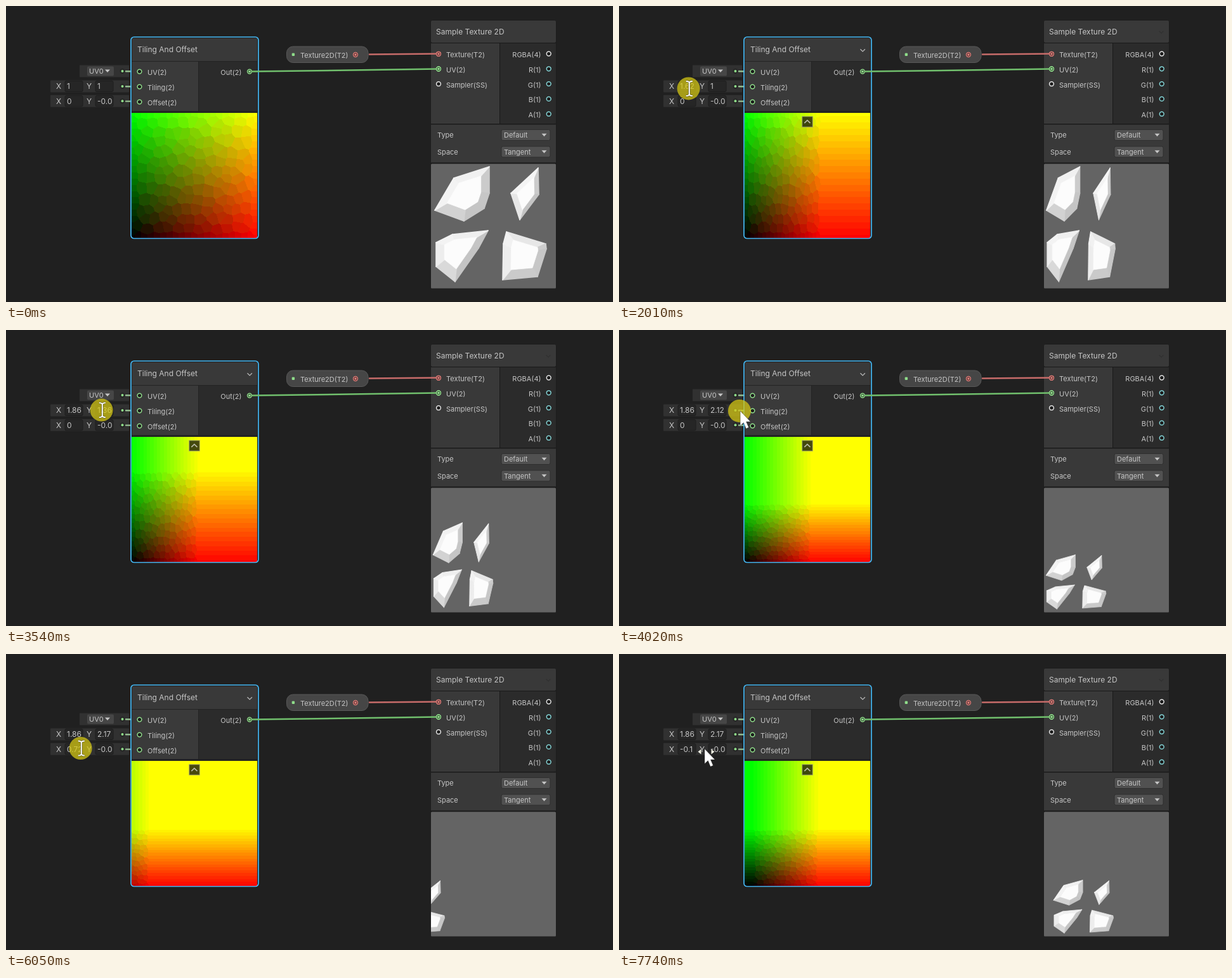
Animation, 957 px wide and 468 px high, one loop 8000 ms. Source, as an HTML page with a canvas:

```html
<!DOCTYPE html>
<html lang="en">
<head>
<meta charset="utf-8">
<title>Tiling and offset</title>
<style>
  html, body { margin: 0; width: 100%; height: 100%; overflow: hidden; background: #202020; }
  #uv, #ui { position: absolute; display: block; }
  #uv { left: 198px; top: 169px; }
  #ui { left: 0; top: 0; }
  text { font: 11px Inter, sans-serif; fill: #c6c6c6; white-space: pre; }
  .big { font-size: 12px; }
</style>
</head>
<body>
<canvas id="uv" width="198" height="198"></canvas>
<svg id="ui" width="957" height="468" viewBox="0 0 957 468"></svg>
<script>
const GREEN = '#8fdc8a', RED = '#dc7a76', CYAN = '#84d4d6', WHITE = '#e4e4e4', BLUE = '#44b8f4';

const rect = (x, y, w, h, fill, extra = '') =>
  `<rect x="${x}" y="${y}" width="${w}" height="${h}" fill="${fill}" ${extra}/>`;
// y is the middle of the line of text
const label = (x, y, s, extra = '') => `<text x="${x}" y="${y + 4}" ${extra}>${s}</text>`;
const big = (x, y, s, extra = '') => label(x, y + .3, s, 'class="big" ' + extra);
const right = (x, y, s) => label(x, y, s, 'text-anchor="end"');
const line = (x1, y1, x2, y2, color, w) =>
  `<path d="M${x1} ${y1}L${x2} ${y2}" stroke="${color}" stroke-width="${w}" stroke-linecap="round"/>`;
const dot = (x, y, r, fill) => `<circle cx="${x}" cy="${y}" r="${r}" fill="${fill}"/>`;
const port = (x, y, color, linked) =>
  `<circle cx="${x}" cy="${y}" r="3.4" fill="#1c1c1c" stroke="${color}" stroke-width="1.5"/>` +
  (linked ? dot(x, y, 1.9, color) : '');
const down = (x, y) => `<path d="M${x - 4} ${y - 2}h8l-4 4.4z" fill="#c6c6c6"/>`;

function inputStrip(x, y) {
  return rect(x, y - 9.5, 194 - x, 19, '#313131', 'rx="1"') +
    dot(183.5, y, 4, '#262626') + dot(183.5, y, 2, GREEN) +
    line(189, y + .3, 206, y + .5, '#93bd90', 2.4);
}

function vectorRow(y, idX, idY) {
  const field = (x, name, id) => big(x, y, name) +
    rect(x + 14, y - 8.5, 28, 17, '#262626', 'rx="2" stroke="#1e1e1e"') + big(x + 17, y, '', `id="${id}"`);
  return inputStrip(70, y) + field(79, 'X', idX) + field(127, 'Y', idY);
}

function tilingNode() {
  const ports = ['UV(2)', 'Tiling(2)', 'Offset(2)'];
  return rect(198, 50, 199, 119, '#232323', 'rx="4"') +
    rect(198.5, 51, 197.5, 36, '#393939') + rect(198.5, 88, 104.5, 78, '#3a3a3a') + rect(304, 88, 92, 78, '#2b2b2b') +
    big(207, 69, 'Tiling And Offset') +
    ports.map((s, i) => label(223, 105 + 24 * i, s) + port(210.5, 103.6 + 24 * i, GREEN)).join('') +
    right(371.5, 105, 'Out(2)') + port(384, 103.6, GREEN, true) +
    rect(197, 49, 201, 318.5, 'none', `rx="5" stroke="${BLUE}" stroke-width="1.7"`);
}

const dropdown = (y, name, value) =>
  label(680, y, name) + rect(781, y - 8.5, 77, 17, '#515151', 'rx="2.5" stroke="#2e2e2e"') +
  label(785, y, value) + down(848.5, y - .2);

function sampleNode() {
  const ins = [['Texture(T2)', RED, true], ['UV(2)', GREEN, true], ['Sampler(SS)', WHITE]];
  const outs = ['RGBA(4)', 'R(1)', 'G(1)', 'B(1)', 'A(1)'];
  return rect(669.5, 22.5, 198, 424.5, '#1a1a1a', 'rx="4"') +
    rect(670, 23, 197, 35, '#393939', 'rx="2"') +
    rect(670, 59, 108, 127, '#393939') + rect(779, 59, 88, 127, '#2b2b2b') +
    rect(670, 187.5, 197, 60, '#393939') + rect(670, 249.5, 197, 197, '#646464', 'rx="1.5"') +
    big(678, 41, 'Sample Texture 2D') +
    ins.map(([s, c, on], i) => label(694, 77 + 24 * i, s) + port(682, 75.8 + 23.7 * i, c, on)).join('') +
    outs.map((s, i) => right(843.5, 77 + 23.8 * i, s) + port(855.7, 75.5 + 23.8 * i, i ? CYAN : WHITE)).join('') +
    dropdown(204, 'Type', 'Default') + dropdown(230.5, 'Space', 'Tangent');
}

// A clockwise outline shrinks to the bright face; each side is shaded by where it points
function stone(cx, cy, outline) {
  const pts = outline.split(' ').map(p => p.split(',').map(Number));
  const face = pts.map(([x, y]) => [cx + (x - cx) * .62, cy + (y - cy) * .62]);
  const shape = (p, c, w) =>
    `<polygon points="${p.join(' ')}" fill="${c}" stroke="${c}" stroke-width="${w}" stroke-linejoin="round"/>`;
  return pts.map((a, i) => {
    const j = (i + 1) % pts.length, b = pts[j];
    const dx = b[0] - a[0], dy = b[1] - a[1];
    const v = Math.round(220 - 17 * (dy - dx) / Math.hypot(dx, dy));
    return shape([a, b, face[j], face[i]], `rgb(${v},${v},${v})`, 1.6);
  }).join('') + shape(face, '#fcfcfc', .8);
}
const stones =
  stone(727, 293, '762,254 762,296 754,320 722,340 676,323 706,272') +
  stone(821, 297, '839,256 840,298 810,338 796,296') +
  stone(713, 383, '760,355 745,383 708,436 678,412 678,374 704,361') +
  stone(817, 391, '789,357 851,376 852,384 838,428 783,433 784,376');

const BEAM = 'M-5-11.5Q0-11.5 0-8.5Q0-11.5 5-11.5M0-9V9M-5 11.5Q0 11.5 0 8.5Q0 11.5 5 11.5';
const ui = document.getElementById('ui');
ui.innerHTML =
  '<clipPath id="view"><rect x="670" y="249.5" width="197" height="197"/></clipPath>' +
  inputStrip(116, 103) + rect(128, 95.5, 42, 15, '#464646', 'rx="2"') + label(131, 103, 'UV0') + down(160, 102.6) +
  vectorRow(127, 'tileX', 'tileY') + vectorRow(150.3, 'offX', 'offY') +
  tilingNode() + sampleNode() +
  line(389, 103.6, 680, 99.5, '#71c06d', 2.5) + line(573, 76.6, 680, 75.6, '#c86c6a', 2.5) +
  port(682, 99.5, GREEN, true) + port(682, 75.8, RED, true) +
  rect(442.5, 64, 128.5, 25.5, '#464646', 'rx="10" stroke="#585858"') +
  rect(450.7, 74.6, 4.4, 4.4, GREEN, 'rx="1"') + label(464, 78, 'Texture2D(T2)') + port(551, 77, RED, true) +
  `<g clip-path="url(#view)"><g id="stones">${stones}</g></g>` +
  '<g id="marks" fill="none"><path d="M380.5 68.3l3.7 3.6 3.7-3.6" stroke="#b8b8b8" stroke-width="1.3"/>' +
  rect(288.7, 174.7, 16.6, 16.6, '#101010', 'fill-opacity=".76" stroke="#a8a890" stroke-opacity=".5" stroke-width="1.5"') +
  '<path d="M292.3 185.2l4.6-4.5 4.6 4.5" stroke="#b9b9a8" stroke-width="1.7"/></g>' +
  '<path id="dim" d="M851.5 39.8l3.5 3 3.5-3" fill="none" stroke="#313131" stroke-width="1.3"/>' +
  rect(669, 22, 199, 425, 'none', `id="hover" rx="5" stroke="${BLUE}" stroke-opacity=".5" stroke-width="1.5"`) +
  '<circle id="press" r="18" fill="#d8ca14" opacity=".73"/>' +
  '<g id="cursor"><path id="arrow" d="M0 0V23.5L5.3 18.6 9.2 28 13.4 26.2 9.5 17.1H16.2Z" fill="#fff" ' +
  'stroke="#222" stroke-opacity=".5" stroke-width=".8"/>' +
  '<path id="sides" d="M-5.5 .5v8l-5-4zM10.5 .5v8l5-4z" fill="#f4f4e4"/>' +
  `<g id="beam" fill="none"><path d="${BEAM}" stroke="#222" stroke-width="3.4" stroke-opacity=".5"/>` +
  `<path d="${BEAM}" stroke="#fff" stroke-width="1.9"/></g></g>`;

const el = {};
ui.querySelectorAll('[id]').forEach(n => el[n.id] = n);
const show = (n, on) => n.setAttribute('visibility', on ? 'visible' : 'hidden');

// Colour steps: each colour snaps to the nearest of a scattered set
let seed = 7;
const rnd = () => (seed = seed * 16807 % 2147483647) / 2147483647;
const swatches = [];
for (let i = 0; i <= 20; i++) {
  const e = i / 20;
  swatches.push([e, 0], [e, 1], [0, e], [1, e]);
}
for (let j = 0; j < 12; j++) for (let i = 0; i < 12; i++)
  swatches.push([(i + .75 + (j % 2) * .4 + (rnd() - .5) * .7) / 13, (j + 1 + (rnd() - .5) * .7) / 13]);

const N = 198, steps = new Uint8Array(N * N);
for (let k = 0; k < N * N; k++) {
  const r = (k % N) / (N - 1), g = Math.floor(k / N) / (N - 1);
  let best = 9;
  swatches.forEach(([a, b], n) => {
    const d = (a - r) ** 2 + (b - g) ** 2;
    if (d < best) { best = d; steps[k] = n; }
  });
}

const ctx = document.getElementById('uv').getContext('2d');
const img = ctx.createImageData(N, N);
const level = v => Math.round(Math.min(1, Math.max(0, v)) * (N - 1));
let last = '';

function paintUV(tx, ty, ox) {
  const key = [tx, ty, ox].join();
  if (key === last) return;
  last = key;
  for (let y = 0, p = 0; y < N; y++) {
    const row = level(ty * (1 - (y + .5) / N)) * N;
    for (let x = 0; x < N; x++, p += 4) {
      const c = swatches[steps[row + level(tx * (x + .5) / N + ox)]];
      img.data[p] = c[0] * 255;
      img.data[p + 1] = c[1] * 255;
      img.data[p + 3] = 255;
    }
  }
  ctx.putImageData(img, 0, 0);
}

// Cursor stops
const XLABEL = [82, 129], YLABEL = [133, 126], OFFSET = [82, 147], FIELD = [162, 152], OFFSET_Y = [134, 148];
// Glides: start, end, stop; a drag also names the value it changes
const moves = [
  [200, 1000, XLABEL],
  [1605, 2405, [122, 131], 'tx', 1.86],
  [2440, 2610, [137, 126]],
  [2820, 3080, YLABEL],
  [3400, 4160, [194, 128], 'ty', 2.17],
  [4240, 4840, OFFSET],
  [5165, 5790, [121, 149], 'ox', .76],
  [5790, 6050, [119, 149], 'ox', .72],
  [6050, 6430, [80, 148], 'ox', -.11],
  [6480, 6670, FIELD],
  [6880, 6940, OFFSET_Y],
  [7030, 7150, FIELD],
  [7350, 7480, [139, 148]],
  [7690, 7740, [135, 150]]
];
const easeOut = p => 1 - (1 - p) ** 1.8;
const mix = (a, b, p) => a + (b - a) * p;

function stateAt(t) {
  const s = { x: 880, y: 452, tx: 1, ty: 1, ox: 0, pressed: false };
  for (const [start, end, [x, y], name, value] of moves) {
    if (t < start) break;
    const p = easeOut(Math.min(1, (t - start) / (end - start)));
    s.x = mix(s.x, x, p);
    s.y = mix(s.y, y, p);
    if (name) s[name] = mix(s[name], value, p);
    s.pressed = !!name && t < end;
  }
  return s;
}

const round = v => Math.round(v * 100) / 100;
const shown = v => String(v).slice(0, 4);

function draw(t) {
  const s = stateAt(t), { x, y } = s;
  const tx = round(s.tx), ty = round(s.ty), ox = round(s.ox);
  el.tileX.textContent = shown(tx);
  el.tileY.textContent = shown(ty);
  el.offX.textContent = shown(ox);
  el.offY.textContent = '-0.0';
  paintUV(tx, ty, ox);
  el.stones.setAttribute('transform',
    `matrix(${1 / tx} 0 0 ${1 / ty} ${670 - (670 + ox * 197) / tx} ${446 - 446 / ty})`);

  const live = t >= 200, inRows = y > 117 && y < 160;
  const beam = inRows && (x > 93 && x < 122 || x > 141 && x < 169);
  const sides = inRows && (x > 75 && x < 90 || x > 125 && x < 136);
  el.cursor.setAttribute('transform', `translate(${x} ${y})`);
  show(el.arrow, live && !beam);
  show(el.beam, live && beam);
  show(el.sides, live && sides);
  el.press.setAttribute('cx', x - 1.2);
  el.press.setAttribute('cy', y);
  show(el.press, s.pressed);
  show(el.hover, live && x > 670 && x < 867);
  show(el.dim, live && x < 867);
  show(el.marks, live && x < 398);
}

function tick(now) {
  draw(now % 8000);
  requestAnimationFrame(tick);
}
draw(0);
requestAnimationFrame(tick);
</script>
</body>
</html>
```
